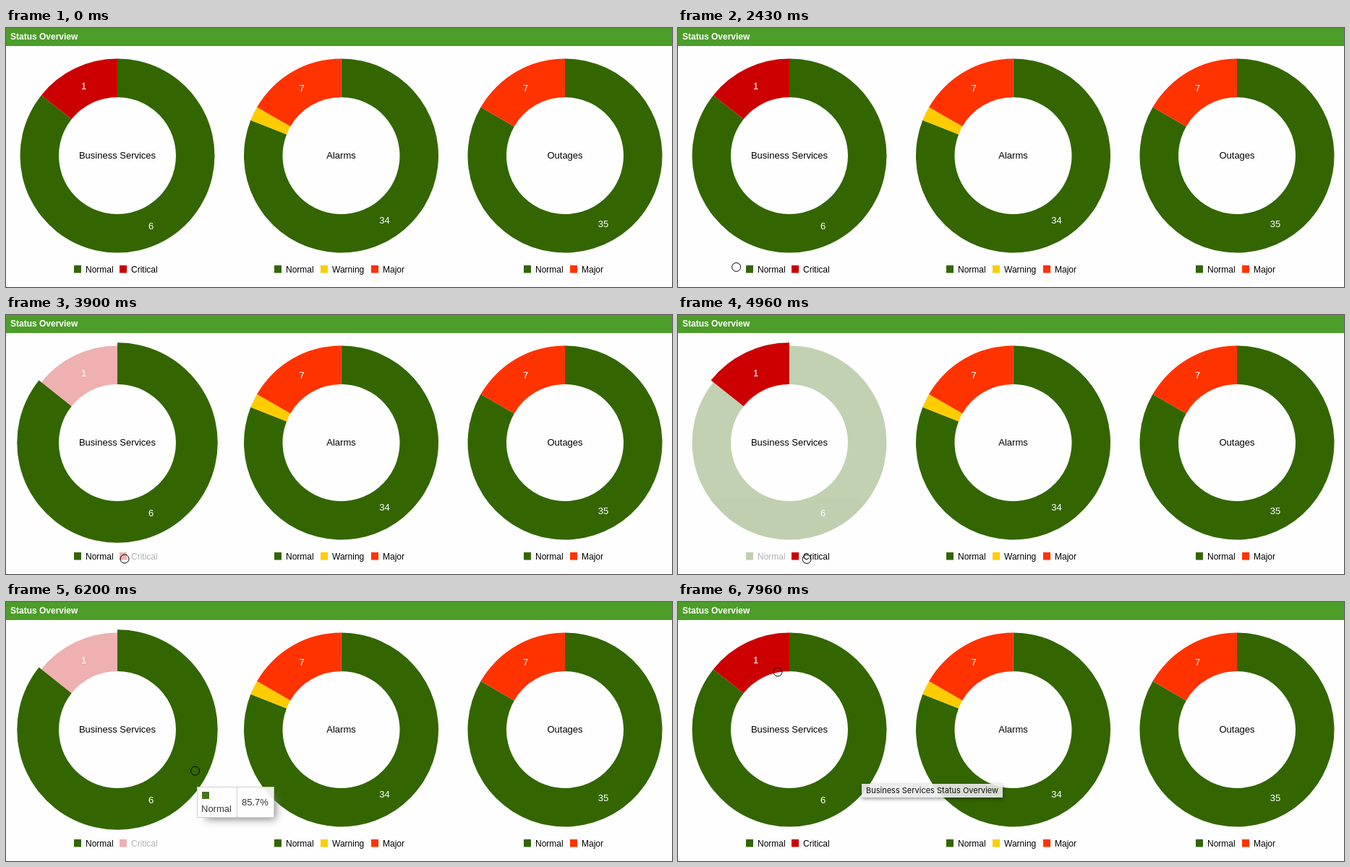
Recreate the animation shown at these times as an HTML page. Size 921 px wide and 359 px high, loop 8 s.

```html
<!DOCTYPE html>
<html lang="en">
<head>
<meta charset="utf-8">
<title>Status Overview</title>
<style>
  html, body { margin: 0; width: 921px; height: 359px; overflow: hidden; background: #fefefe; }
  body { position: relative; font-family: "Liberation Sans", Arial, sans-serif; }
  svg { position: absolute; left: 0; top: 0; }
  .heading { font-size: 12px; font-weight: bold; fill: #fff; }
  .title { font-size: 13px; text-anchor: middle; fill: #000; }
  .value { font-size: 13px; text-anchor: middle; fill: #fff; }
  .key { font-size: 12px; fill: #000; }
  #tooltip, #hint, #cursor { position: absolute; left: 0; top: 0; box-sizing: border-box; }
  #tooltip {
    width: 107px; height: 43px; border: 1px solid #ccc; background: #fff; color: #222;
    opacity: .9; box-shadow: 7px 7px 12px -5px #777; font-size: 13px; line-height: 15px;
  }
  #tooltip * { position: absolute; }
  #tooltip i { left: 6px; top: 6px; width: 10px; height: 10px; background: #360; }
  #tooltip b { left: 54px; top: 0; height: 41px; border-left: 1px dotted #999; }
  #tooltip .name { left: 5px; top: 22px; }
  #tooltip .share { left: 61px; top: 13px; }
  #hint {
    left: 254px; top: 252px; width: 195px; height: 19px; padding-left: 6px;
    background: rgba(236, 236, 236, .9); box-shadow: 0 2px 5px rgba(0, 0, 0, .4);
    color: #111; font: 11px/19px Inter, "Liberation Sans", sans-serif; white-space: nowrap;
  }
  #cursor { width: 13px; height: 13px; border: 1.6px solid #000; border-radius: 50%; }
</style>
</head>
<body>
<svg id="stage" width="921" height="359" viewBox="0 0 921 359"></svg>
<div id="tooltip"><i></i><span class="name">Normal</span><b></b><span class="share">85.7%</span></div>
<div id="hint">Business Services Status Overview</div>
<div id="cursor"></div>
<script>
const LOOP = 8000;
const INNER = 81, OUTER = 134.5, PEAK = OUTER / 0.95, FOCUSED = PEAK * 0.98;
const COLORS = { Normal: '#336600', Critical: '#cc0000', Warning: '#ffcc00', Major: '#ff3300' };

// Slices: [name, count, label x, label baseline, legend x]
const charts = [
  { title: 'Business Services', x: 154,
    slices: [['Normal', 6, 200.5, 279, 94], ['Critical', 1, 107.5, 85, 157]] },
  { title: 'Alarms', x: 463.5,
    slices: [['Normal', 34, 523.5, 271, 371], ['Warning', 1, 0, 0, 435], ['Major', 7, 409, 88, 505]] },
  { title: 'Outages', x: 773,
    slices: [['Normal', 35, 826, 276, 716], ['Major', 7, 718.5, 88, 780]] }
];

// Pointer moves: [start, end, from, to]
const moves = [
  [1010, 1460, [34.5, 366], [38, 323]],
  [1940, 2760, [38, 323], [104, 336]],
  [3540, 4040, [104, 336], [178, 338.5]],
  [4950, 5770, [178, 338.5], [302, 244]],
  [5780, 6330, [302, 244], [255, 232.5]],
  [7250, 7960, [255, 232.5], [138, 97]]
];

// Hovered slice of the first chart: [on, off, slice]
const hovers = [[2680, 3910, 0], [3910, 5150, 1], [6060, 7460, 0]];
const TOOLTIP = [6060, 7460], HINT_AT = 7260, TOOLTIP_LAG = 33;

const $ = id => document.getElementById(id);
const stage = $('stage'), tooltip = $('tooltip'), hint = $('hint'), cursor = $('cursor');
const clamp = v => Math.max(0, Math.min(1, v));
const lerp = (a, b, p) => a + (b - a) * p;
const smooth = p => p * p * (3 - 2 * p);
const cubic = p => p < 0.5 ? 4 * p ** 3 : 1 - 4 * (1 - p) ** 3;

function add(parent, tag, attrs, text) {
  const el = document.createElementNS('http://www.w3.org/2000/svg', tag);
  for (const key in attrs) el.setAttribute(key, attrs[key]);
  if (text !== undefined) el.textContent = text;
  return parent.appendChild(el);
}

function arcPath(cx, from, to, outer) {
  const point = (r, turn) => {
    const a = turn * 2 * Math.PI;
    return `${(cx + r * Math.sin(a)).toFixed(2)} ${(177 - r * Math.cos(a)).toFixed(2)}`;
  };
  const large = to - from > 0.5 ? 1 : 0;
  return `M${point(outer, from)}A${outer} ${outer} 0 ${large} 1 ${point(outer, to)}` +
    `L${point(INNER, to)}A${INNER} ${INNER} 0 ${large} 0 ${point(INNER, from)}Z`;
}

function buildChart({ title, x, slices }) {
  const total = slices.reduce((sum, s) => sum + s[1], 0);
  let start = 0;
  const parts = slices.map(([name, count, lx, ly, keyX]) => {
    const from = start, to = start += count / total, fill = COLORS[name];
    const group = add(stage, 'g', {});
    const arc = add(group, 'path', { d: arcPath(x, from, to, OUTER), fill });
    if (lx) add(group, 'text', { x: lx, y: ly, class: 'value' }, count);
    const key = add(stage, 'g', {});
    add(key, 'rect', { x: keyX, y: 329, width: 10, height: 10.5, fill });
    add(key, 'text', { x: keyX + 16, y: 339, class: 'key' }, name);
    return { x, from, to, group, arc, key };
  });
  add(stage, 'text', { x, y: 180.5, class: 'title' }, title);
  return parts;
}

add(stage, 'rect', { width: 921, height: 25, fill: '#4c9d29' });
add(stage, 'text', { x: 6, y: 16, class: 'heading' }, 'Status Overview');
const [services] = charts.map(buildChart);

function pointerAt(t) {
  const [start, end, a, b] = moves.filter(m => t >= m[0]).pop() || moves[0];
  const p = smooth(clamp((t - start) / (end - start)));
  return [lerp(a[0], b[0], p), lerp(a[1], b[1], p)];
}

// Overshoots for 50 ms, settles for 100 ms, and shrinks back in 50 ms.
function radiusAt(t, slice) {
  const hover = hovers.filter(h => h[2] === slice && t >= h[0]).pop();
  if (!hover) return OUTER;
  const [on, off] = hover;
  if (t >= off) return lerp(FOCUSED, OUTER, cubic(clamp((t - off) / 50)));
  if (t < on + 50) return lerp(OUTER, PEAK, cubic((t - on) / 50));
  return lerp(PEAK, FOCUSED, cubic(clamp((t - on - 50) / 100)));
}

function place(el, shown, x, y) {
  el.style.display = shown ? 'block' : 'none';
  el.style.transform = `translate(${x}px, ${y}px)`;
}

function render(t) {
  const hover = hovers.find(h => t >= h[0] && t < h[1]);
  services.forEach((part, i) => {
    const opacity = hover && hover[2] !== i ? 0.3 : 1;
    part.arc.setAttribute('d', arcPath(part.x, part.from, part.to, radiusAt(t, i)));
    part.group.setAttribute('opacity', opacity);
    part.key.setAttribute('opacity', opacity);
  });
  const [x, y] = pointerAt(t);
  place(cursor, t >= moves[0][0], x - 6.5, y - 6.5);
  const [tx, ty] = pointerAt(t - TOOLTIP_LAG);
  place(tooltip, t >= TOOLTIP[0] && t < TOOLTIP[1], Math.round(tx - 1), Math.round(ty + 21.5));
  place(hint, t >= HINT_AT, 0, 0);
}

const began = performance.now();
function tick() {
  render((performance.now() - began) % LOOP);
  requestAnimationFrame(tick);
}
tick();
</script>
</body>
</html>
```
